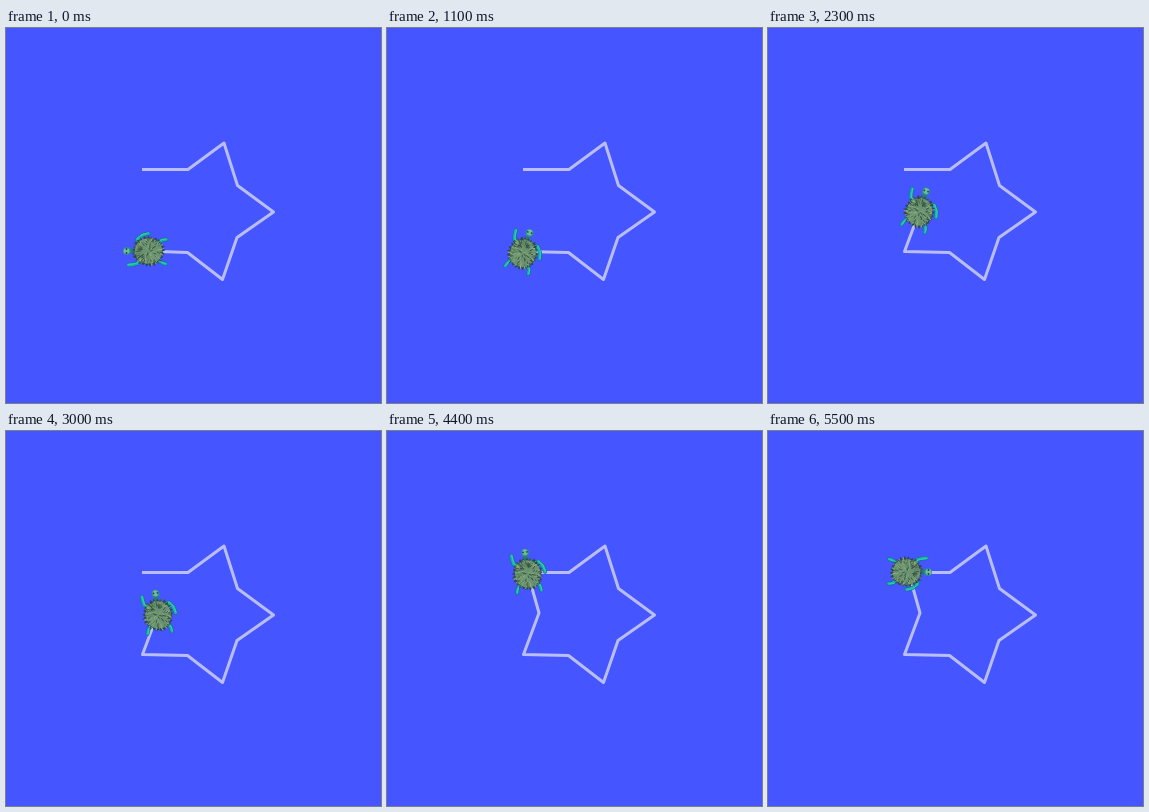
An HTML page with a canvas that plays this animation: 375x375 px, repeating every 5600 ms.

```html
<!DOCTYPE html>
<html lang="en">
<head>
<meta charset="utf-8">
<title>Turtle star</title>
<style>
  html, body { margin: 0; width: 100%; height: 100%; overflow: hidden; background: #4555ff; }
  canvas { display: block; width: 375px; height: 375px; }
</style>
</head>
<body>
<canvas id="stage" width="375" height="375"></canvas>
<script>
const ctx = document.getElementById('stage').getContext('2d');
const LOOP = 5600, STEP = 100;

const drawn = [[136, 141.5], [182, 141.5], [218, 115], [231.5, 157.5], [267.5, 184],
               [231, 209.5], [216.5, 251.5], [181.5, 224.5]];
const corners = [[136.5, 223.5], [152, 182], [140.5, 141]];

// time, x, y, heading in degrees counter-clockwise from east
const poses = [
  [0, 140.5, 223, 180],
  [100, ...corners[0], 180],
  [1100, ...corners[0], 72],
  [1200, ...corners[0], 72],
  [2200, ...corners[1], 72],
  [2300, ...corners[1], 72],
  [3300, ...corners[1], 108],
  [4300, ...corners[2], 108],
  [5300, ...corners[2], 0],
  [LOOP, ...corners[2], 0]
];

function poseAt(t) {
  const i = poses.findIndex((p, n) => n > 0 && t < p[0]);
  const a = poses[i - 1], b = poses[i];
  const k = (t - a[0]) / (b[0] - a[0]);
  return a.slice(1).map((v, n) => v + (b[n + 1] - v) * k);
}

function randomFrom(seed) {
  return () => (seed = (seed * 16807) % 2147483647) / 2147483647;
}

function stroke(points, color, width) {
  ctx.beginPath();
  points.forEach(([x, y]) => ctx.lineTo(x, y));
  ctx.strokeStyle = color;
  ctx.lineWidth = width;
  ctx.stroke();
}

function ellipse(x, y, rx, ry, color) {
  ctx.beginPath();
  ctx.ellipse(x, y, rx, ry, 0, 0, Math.PI * 2);
  ctx.fillStyle = color;
  ctx.fill();
}

function limb(points, width) {
  stroke(points, '#176f93', width);
  stroke(points, '#16b3b4', width - 1.2);
  stroke(points.map(([x, y]) => [x + 0.5, y - 0.5]), '#36d0a0', 1);
}

function drawShell() {
  const rnd = randomFrom(77);
  const spikes = 25;
  ctx.beginPath();
  for (let i = 0; i < spikes * 2; i++) {
    const a = i * Math.PI / spikes;
    const r = i % 2 ? 0.86 : 1 + rnd() * 0.1;
    ctx.lineTo(Math.cos(a) * 15 * r, 2 + Math.sin(a) * 16 * r);
  }
  ctx.closePath();
  ctx.fillStyle = '#2b4a4c';
  ctx.fill();
  ellipse(0, 2, 12.8, 13.8, '#6b9270');

  // short scratchy scales fanning out from the middle
  const tones = ['#344f3c', '#93b484', '#4d7355', '#82a67e', '#2c443a'];
  for (let i = 0; i < 130; i++) {
    const a = rnd() * Math.PI * 2, r = Math.sqrt(rnd()) * 0.95;
    const x = Math.cos(a) * 13.5 * r, y = 2 + Math.sin(a) * 14.5 * r;
    const bend = a + (rnd() - 0.5), len = 1.5 + rnd() * 2;
    stroke([[x, y], [x + Math.cos(bend) * len, y + Math.sin(bend) * len]],
           tones[i % tones.length], 0.8);
  }
}

function drawTurtle(x, y, heading) {
  ctx.save();
  ctx.translate(x, y);
  ctx.rotate((90 - heading) * Math.PI / 180);
  limb([[-9, -6], [-12.5, -9], [-13.5, -13], [-14, -18]], 4);
  limb([[7, -8], [12, -9], [16, -4], [17.5, 2]], 4);
  limb([[-9, 12], [-12, 16], [-13, 19.5]], 3.8);
  limb([[9, 12], [11, 16], [11.5, 20]], 3.8);
  stroke([[0, -12], [0, -17]], '#27777c', 5);
  ellipse(0, -19.5, 4, 4, '#2b8c91');
  ellipse(0, -20, 2.9, 3, '#6fb99f');
  ellipse(-2, -20, 0.9, 0.9, '#203e50');
  ellipse(2, -20, 0.9, 0.9, '#203e50');
  drawShell();
  ctx.restore();
}

function render(t) {
  const [x, y, heading] = poseAt(t);
  const reached = t < 100 ? 0 : t < 2200 ? 1 : 2;
  ctx.fillStyle = '#4555ff';
  ctx.fillRect(0, 0, 375, 375);
  ctx.lineCap = 'butt';
  ctx.lineJoin = 'round';
  stroke([...drawn, ...corners.slice(0, reached), [x, y]], '#b9befa', 3);
  ctx.lineCap = 'round';
  drawTurtle(x, y, heading);
}

const start = performance.now();
function tick() {
  const t = (performance.now() - start) % LOOP;
  render(Math.floor(t / STEP) * STEP);
  requestAnimationFrame(tick);
}
tick();
</script>
</body>
</html>
```
